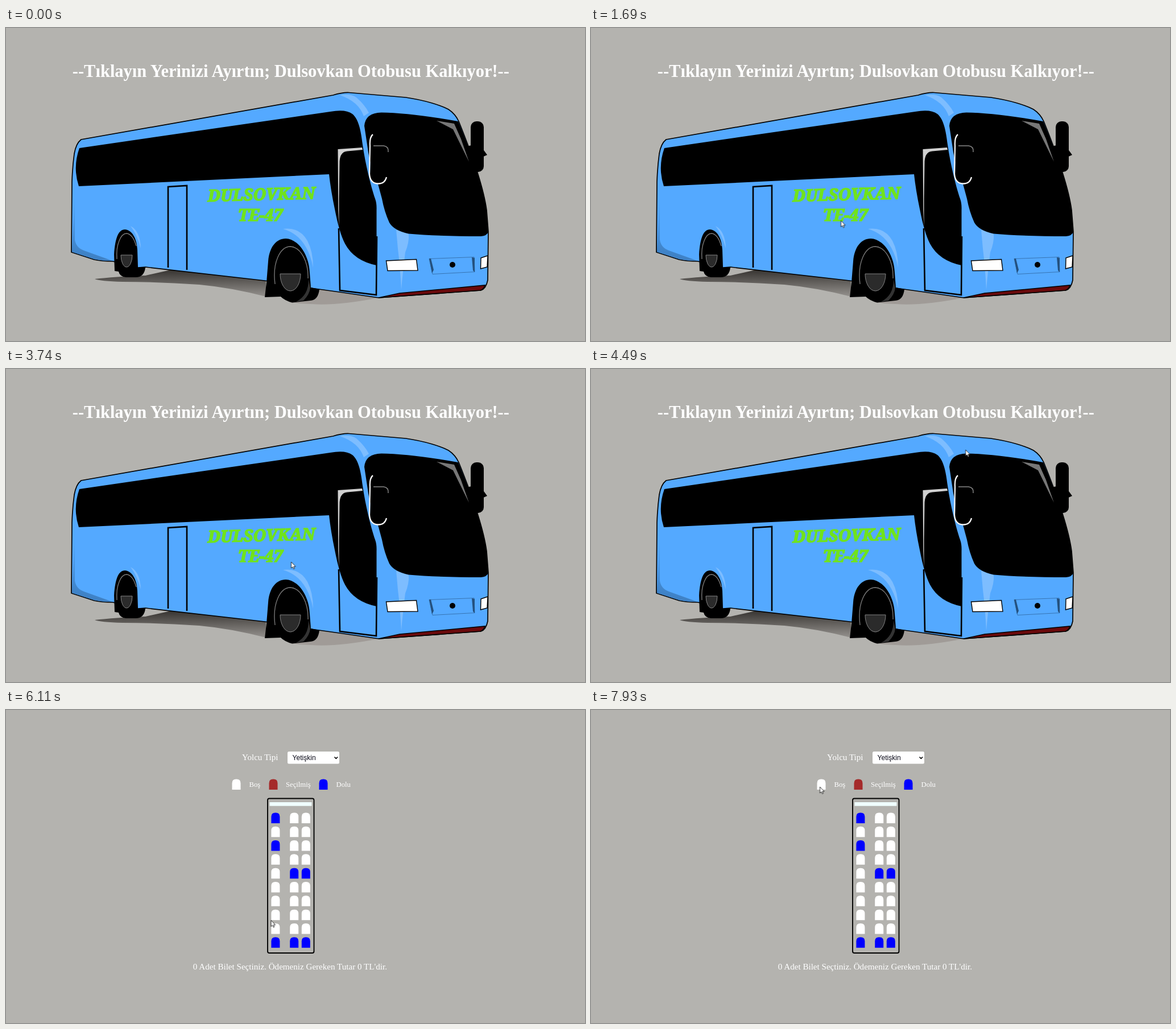
These frames come from a looping animation (1018 px wide and 550 px high, 8 s). An HTML page:

```html
<!DOCTYPE html>
<html lang="tr">
<head>
<meta charset="utf-8">
<title>Otobüs bileti</title>
<style>
  html, body { margin: 0; width: 100%; height: 100%; overflow: hidden; background: #b4b3af; }
  svg { display: block; width: 100%; height: 100%; }
  text { fill: #fff; font-family: "Liberation Serif", "Times New Roman", serif; }
  .title { font-size: 30.5px; font-weight: bold; }
  .sign text { font: italic 900 29px "Noto Serif", serif; fill: #70e31c; stroke: #70e31c; stroke-width: 1.6; text-anchor: middle; }
  .page { font-size: 15.1px; }
  .legend { font-size: 12.7px; }
  .page .option { font: 12.1px "Liberation Sans", Arial, sans-serif; fill: #0a0a18; }
  .line { fill: none; stroke: #000; stroke-width: 2.6; }
  .shine { fill: #7dbdff; }
  .rim { fill: none; stroke: #777; stroke-width: 1.4; }
  .hub { fill: #2b2b2b; stroke: #858585; stroke-width: 1; }

  .bus, .page, .ring, .beam, .arrow { animation: 8s step-end infinite; }
  .bus { animation-name: leave; }
  .page { animation-name: enter; }
  .ring { animation-name: click; }
  .beam { animation-name: beam; }
  .arrow { animation-name: arrow; }
  .pointer { animation: move 8s steps(3, jump-start) infinite; }

  @keyframes leave { 0% { visibility: visible } 76.375%, 100% { visibility: hidden } }
  @keyframes enter { 0% { visibility: hidden } 76.375%, 100% { visibility: visible } }
  @keyframes click { 0%, 66.5%, 100% { visibility: hidden } 64.75% { visibility: visible } }
  @keyframes beam { 0%, 39%, 100% { visibility: hidden } 35.6% { visibility: visible } }
  @keyframes arrow { 0%, 39%, 100% { visibility: visible } 35.6% { visibility: hidden } }

  @keyframes move {
    0% { transform: translate(1025px, 570px) }
    3.375% { transform: translate(1025px, 570px); animation-timing-function: steps(11, jump-start) }
    12.75% { transform: translate(445px, 242px); animation-timing-function: steps(1, jump-start) }
    13.6%, 17.5625% { transform: translate(439.5px, 252px); animation-timing-function: steps(5, jump-start) }
    22% { transform: translate(439.5px, 338.5px); animation-timing-function: steps(2, jump-start) }
    23.75% { transform: translate(460px, 354px); animation-timing-function: steps(2, jump-start) }
    25.5% { transform: translate(504px, 320px) }
    28% { transform: translate(439px, 290px) }
    29.625% { transform: translate(439px, 290px); animation-timing-function: steps(8, jump-start) }
    36.4375%, 39% { transform: translate(362.5px, 80.5px) }
    41.625% { transform: translate(600px, 100px) }
    44.25% { transform: translate(737px, 230px); animation-timing-function: steps(4, jump-start) }
    47.575% { transform: translate(501.5px, 339px); animation-timing-function: steps(2, jump-start) }
    49.375% { transform: translate(380px, 320px) }
    51.9375% { transform: translate(259px, 200px) }
    54.5% { transform: translate(480px, 26px) }
    57.0625% { transform: translate(748px, 200px) }
    59.625% { transform: translate(466px, 392px); animation-timing-function: steps(4, jump-start) }
    63.0625% { transform: translate(466px, 369.5px) }
    81.25% { transform: translate(466px, 369.5px); animation-timing-function: steps(8, jump-start) }
    88.1875% { transform: translate(475px, 203px) }
    90.75% { transform: translate(476px, 215px) }
    93.1875% { transform: translate(476px, 215px); animation-timing-function: steps(8, jump-start) }
    99.9375%, 100% { transform: translate(402.5px, 135px) }
  }
</style>
</head>
<body>
<svg viewBox="0 0 1018 550">
  <defs>
    <linearGradient id="shade" gradientUnits="userSpaceOnUse" x1="0" y1="424" x2="0" y2="488">
      <stop offset="0" stop-color="#35322f"/>
      <stop offset="1" stop-color="#b4b1ad"/>
    </linearGradient>
    <linearGradient id="rear" gradientUnits="userSpaceOnUse" x1="118" y1="400" x2="140" y2="300">
      <stop offset="0" stop-color="#3d7fc2"/>
      <stop offset="1" stop-color="#54a9ff"/>
    </linearGradient>
    <path id="seat" d="M0 18.5V7Q0 0 7 0H8Q15 0 15 7V18.5Z"/>
  </defs>

  <g class="bus">
    <text class="title" x="116.8" y="85.5">--Tıklayın Yerinizi Ayırtın; Dulsovkan<tspan x="618">Otobusu Kalkıyor!--</tspan></text>

    <!-- ground shadow -->
    <path fill="url(#shade)" d="M156 441Q190 437 245 435L290 425L457 443V472Q395 456 340 451Q270 446 205 446Q165 445 156 441Z"/>
    <path fill="#a09b97" d="M500 482L545 459L655 474Q590 487 545 485.5Q520 485 500 482Z"/>

    <!-- body -->
    <path fill="#54a9ff" stroke="#000" stroke-width="1.7" d="M115 394L116 270Q117 243 120 221Q123 203 132 196L575 118Q592 113 603 113.5L703 122C737 127 765 136 778 143Q790 151 796 164Q838 268 845 320L848 358L847 443Q844 458 835 461L655 474L586 464L536 457L455 444L245 420L232 421L188 410Q168 410 155 407Z"/>
    <path fill="url(#rear)" d="M121 293V372Q123 386 137 391L187 409Q168 409 155 406L116 393.5Z"/>
    <path class="shine" d="M587 118Q606 115 616 122Q631 135 638 149L629 155Q620 129 587 118Z"/>
    <path class="shine" d="M487 353Q516 349 530 374Q540 393 540 421Q529 365 487 353ZM219 348Q236 357 237 387Q230 362 219 348Z"/>
    <path class="shine" d="M686 354L708 362Q709 377 702 394Q698 425 695 460Q693 420 689 388Z"/>

    <!-- side glass and doors -->
    <path d="M129 211L570 147Q597 142 609 151C620 160 624 180 627 205C632 240 642 280 649 300Q652 308 651.5 320V417Q612 409 596 379Q586 360 578 318Q571 285 568 257L128 278Q117 245 129 211Z"/>
    <path fill="#d0d0d0" d="M583.5 213L626 210L627 214L600 216.500Q588 217 586.5 234L585.5 300V350L584.2 320Z"/>
    <path class="line" d="M585 352L587 461L651 469L652 366M285 421V279L318 277V425"/>

    <!-- windscreen -->
    <path d="M630 172Q632 149 660 148.5Q710 149 795 164Q838 268 845 320L848 358Q846 365 835 366Q760 366 708 361.5Q682 356 674 342Q665 322 661 300L654 274Q639 240 635 205Z"/>
    <path fill="#777" d="M757 163L788 168L800 195L814 235L786 178Z"/>

    <!-- mirrors -->
    <rect x="817" y="164" width="23" height="89" rx="10"/>
    <path d="M808 208L820 206V222L812 219ZM838 212L846 223L837 227Z"/>
    <path d="M641 207H665Q674 210 672 225L670 262Q667 274 654 273.5Q640 273 640 258Z"/>
    <path fill="none" stroke="#f4f4f4" stroke-width="2.3" d="M645 187Q639 192 640 207L639 256Q640 273 654 273.5Q666 274 669 262"/>
    <path fill="none" stroke="#888" stroke-width="1.5" d="M646 207H664Q673 208 672 218"/>

    <!-- front -->
    <path fill="#fff" stroke="#000" stroke-width="1.4" d="M668.5 409L721.5 406.5L724 426L671 426.500ZM835 404L847 400L846 420L834.5 423Z"/>
    <path fill="none" stroke="#24517f" stroke-width=".6" d="M744 405.5L823 402.5L824 428.5L750 432.5Z"/>
    <path fill="#24517f" d="M744 405H747L752 425L749 431ZM819 403L824 404L824 429L821 426Z"/>
    <circle cx="785" cy="416" r="5"/>
    <path fill="#6a090b" stroke="#000" stroke-width="1.6" d="M655 474L692 466L842 452Q840 459 834 461Z"/>

    <!-- rear wheel -->
    <path d="M191 427L190 398C192 368 198 354 209 354C222 355 230 370 231 390L232 421H245Q243 438 228 438H211Q200 437 198 428Z"/>
    <path class="rim" d="M195 406C193 380 202 361 212 361Q223 362 229 383"/>
    <path class="hub" d="M202 399H222A10 21 0 0 1 202 399Z"/>

    <!-- front wheel -->
    <path d="M455 473L458 447L461 410C463 385 475 370 492 370C515 371 533 400 534 430L536 456L551 459Q549 478 535 479L503 482.5Q490 479 483 472Z"/>
    <path class="rim" d="M473 450C468 412 482 384 500 384C519 385 532 412 531 440"/>
    <path fill="#333" d="M532 442Q532 470 510 481L523 479Q534 468 535 456Z"/>
    <path class="hub" d="M482 432H518A18 30 0 0 1 482 432Z"/>

    <g class="sign">
      <text x="449" y="302.5" transform="rotate(-1.5 449 302)">DULSOVKAN</text>
      <text x="447" y="338.5">TE-47</text>
    </g>
  </g>

  <g class="page">
    <text x="415" y="88">Yolcu Tipi</text>
    <rect x="495" y="73" width="91" height="21.5" rx="2.5" fill="#fff"/>
    <text class="option" x="503.5" y="88">Yetişkin</text>
    <path class="line" style="stroke-width: 1.6" d="M577.5 82.5L580.3 85.3L583.1 82.5"/>
    <g class="legend">
      <use href="#seat" x="397.5" y="121.5" fill="#fff"/>
      <text x="427.5" y="135">Boş</text>
      <use href="#seat" x="462.5" y="121.5" fill="#a52a2a"/>
      <text x="492" y="135">Seçilmiş</text>
      <use href="#seat" x="550.5" y="121.5" fill="#00f"/>
      <text x="580.5" y="135">Dolu</text>
    </g>
    <rect x="460" y="155.5" width="81.5" height="271.5" rx="3" fill="none" stroke="#000" stroke-width="1.9"/>
    <rect x="463.5" y="162" width="74" height="6.6" fill="#f0ffff"/>
    <g id="seats"></g>
    <text x="328.8" y="456">0 Adet Bilet Seçtiniz. Ödemeniz Gereken Tutar 0 TL'dir.</text>
  </g>

  <g class="pointer">
    <circle class="ring" r="7.5" fill="#ff0" fill-opacity=".47"/>
    <path class="arrow" fill="#fff" stroke="#000" stroke-width=".8" d="M0 0V11L2.5 8.7L4.2 12.4L5.9 11.6L4.3 8.1H7.6Z"/>
    <path class="beam" fill="none" stroke="#555" d="M-2 -5H2M0 -5V5M-2 5H2"/>
  </g>
</svg>
<script>
  const columns = [466.4, 499.2, 519.8];
  const taken = new Set([0, 6, 13, 14, 27, 28, 29]);
  const seats = document.getElementById('seats');
  for (let i = 0; i < 30; i++) {
    const seat = document.createElementNS('http://www.w3.org/2000/svg', 'use');
    seat.setAttribute('href', '#seat');
    seat.setAttribute('x', columns[i % 3]);
    seat.setAttribute('y', 180.4 + 24.32 * Math.floor(i / 3));
    seat.setAttribute('fill', taken.has(i) ? '#00f' : '#fff');
    seats.append(seat);
  }
</script>
</body>
</html>
```
